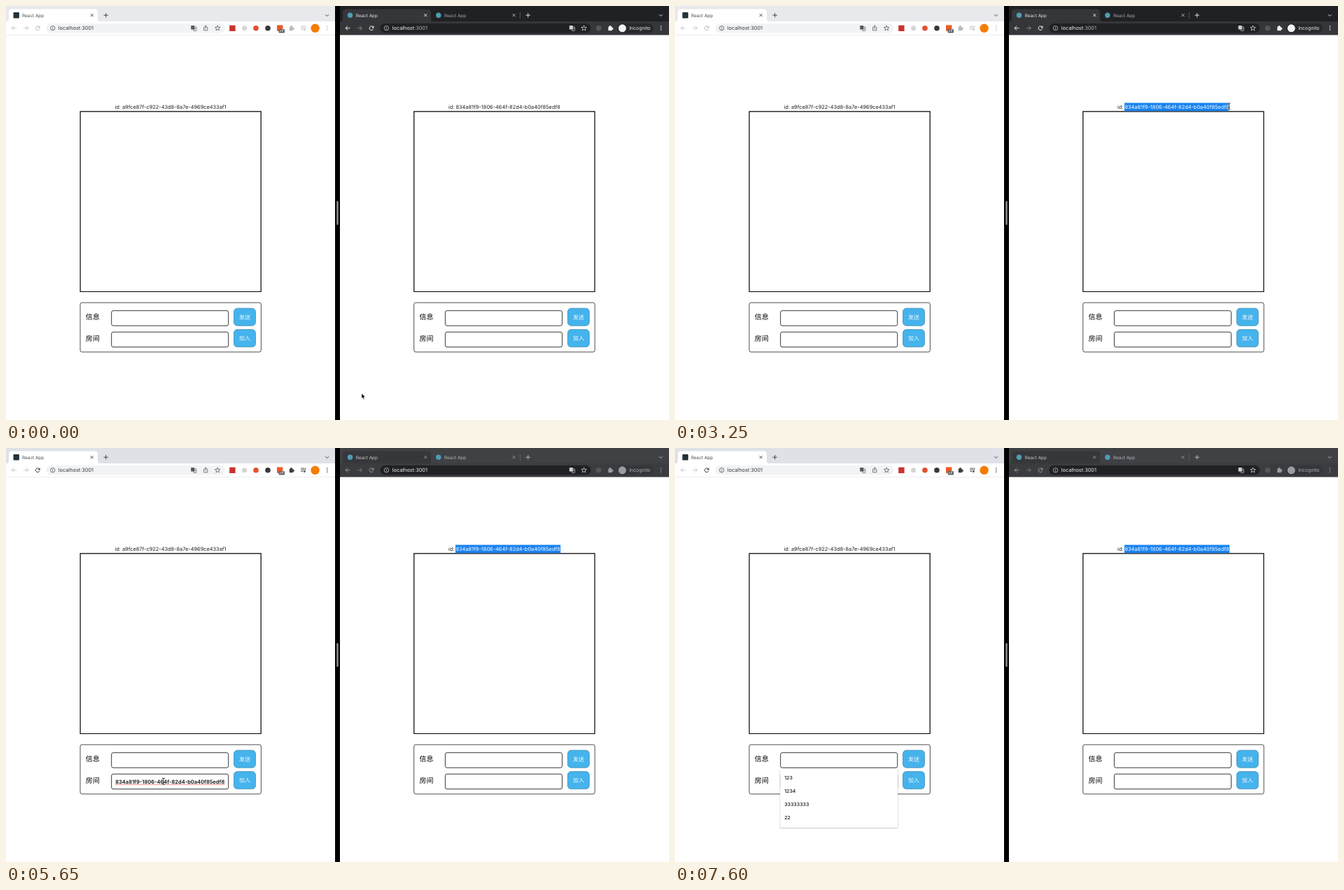
An HTML page with a canvas that plays this animation: 947 by 592 pixels, repeating every 8000 ms.

```html
<!DOCTYPE html>
<html lang="zh">
<head>
<meta charset="utf-8">
<style>
html, body { margin: 0; width: 100%; height: 100%; overflow: hidden; background: #fff; }
canvas { display: block; width: 947px; height: 592px; }
</style>
</head>
<body>
<canvas id="stage"></canvas>
<script>
const W = 947, H = 592, LOOP = 8000, STEP = 50;
const canvas = document.getElementById('stage');
const dpr = window.devicePixelRatio || 1;
canvas.width = W * dpr;
canvas.height = H * dpr;
const ctx = canvas.getContext('2d');
ctx.scale(dpr, dpr);
ctx.textRendering = 'geometricPrecision';

const SANS = 'Inter, sans-serif', CJK = '"Noto Sans CJK SC", "Noto Sans CJK", sans-serif';
const LEFT_ID = 'a9fce87f-c922-43d8-8a7e-4969ce433af1';
const RIGHT_ID = '834a81f9-1806-464f-82d4-b0a40f85edf8';
const ROOMS = ['123', '1234', '22'], MESSAGES = ['123', '1234', '33333333', '22'];
const PAGE_SHIFT = 476.7, SEL_LEFT = 642, SEL_RIGHT = 792;
const BLUE = '#45b3ec', BLUE_HOVER = '#147fb6', BLUE_CLICKED = '#2a97cf';

// Pointer stops: time, x, y
const PATH = [
  [0, 508, 554], [200, 545, 500], [400, 628, 335], [600, 687, 205], [700, 683, 170],
  [850, 642.5, 148.5], [900, 642, 148], [950, 641.5, 145], [1200, 641.5, 145],
  [1250, 642, 145], [1600, 642, 145], [1900, 642.8, 145.5], [2000, 642.8, 145.5],
  [2200, 675, 145], [2450, 760, 146], [2700, 797, 148], [2900, 797, 148],
  [3000, 796, 148.5], [3200, 796, 148.5], [3250, 791.3, 143.5], [3650, 791.3, 143.5],
  [3750, 690, 180], [3850, 430, 290], [3950, 257, 361], [4050, 257, 361],
  [4250, 236, 430], [4450, 222, 480], [4800, 222, 480], [4850, 220, 479],
  [5000, 213.3, 477], [5600, 213.3, 477], [5800, 260, 476], [6000, 322, 479],
  [6200, 341, 480], [6550, 341, 480], [6600, 340.5, 480], [6800, 340.5, 480],
  [7000, 310, 472], [7200, 258, 454], [7400, 243, 448], [8000, 243, 448]
];

function pointer(t) {
  const i = Math.max(1, PATH.findIndex(p => p[0] >= t));
  const [t0, x0, y0] = PATH[i - 1], [t1, x1, y1] = PATH[i];
  const k = (t - t0) / (t1 - t0);
  return { x: x0 + (x1 - x0) * k, y: y0 + (y1 - y0) * k };
}

function rect(x, y, w, h, fill) {
  ctx.fillStyle = fill;
  ctx.fillRect(x, y, w, h);
}
function round(x, y, w, h, r, fill, stroke, lw = 1) {
  ctx.beginPath();
  ctx.roundRect(x, y, w, h, r);
  paint(fill, stroke, lw);
}
function disc(x, y, r, fill, stroke, lw = 1) {
  ctx.beginPath();
  ctx.arc(x, y, r, 0, 7);
  paint(fill, stroke, lw);
}
function paint(fill, stroke, lw) {
  if (fill) { ctx.fillStyle = fill; ctx.fill(); }
  if (stroke) { ctx.strokeStyle = stroke; ctx.lineWidth = lw; ctx.stroke(); }
}
function line(color, lw, ...pts) {
  ctx.beginPath();
  for (let i = 0; i < pts.length; i += 2) ctx.lineTo(pts[i], pts[i + 1]);
  paint(null, color, lw);
}
function text(s, x, mid, size, color, { weight = 400, align = 'left', font = SANS } = {}) {
  ctx.font = `${weight} ${size}px ${font}`;
  ctx.textAlign = align;
  ctx.fillStyle = color;
  ctx.fillText(s, x, mid + size * 0.365);
}

// Browser chrome icons
function cross(x, y, c) {
  line(c, 0.9, x - 2, y - 2, x + 2, y + 2);
  line(c, 0.9, x + 2, y - 2, x - 2, y + 2);
}
function plus(x, y, c) {
  line(c, 1, x - 3.2, y, x + 3.2, y);
  line(c, 1, x, y - 3.2, x, y + 3.2);
}
function chevron(x, y, c) { line(c, 1, x - 2.3, y - 1.1, x, y + 1.2, x + 2.3, y - 1.1); }
function arrow(x, y, dir, c) {
  line(c, 0.95, x - 3.3, y, x + 3.3, y);
  line(c, 0.95, x, y - 3.2, x + 3.2 * dir, y, x, y + 3.2);
}
function reload(x, y, c) {
  ctx.beginPath();
  ctx.arc(x, y, 2.9, 0.4, 5.4);
  paint(null, c, 1);
  ctx.beginPath();
  ctx.moveTo(x + 3.4, y - 3.6);
  ctx.lineTo(x + 3.4, y - 0.3);
  ctx.lineTo(x + 0.3, y - 0.3);
  paint(c);
}
function info(x, y, c) {
  disc(x, y, 3.2, null, c, 0.8);
  rect(x - 0.4, y - 0.4, 0.8, 2.2, c);
  rect(x - 0.4, y - 1.8, 0.8, 0.8, c);
}
function dots(x, y, c) { for (const d of [-2.6, 0, 2.6]) disc(x, y + d, 0.8, c); }
function star(x, y, c) {
  ctx.beginPath();
  for (let i = 0; i < 10; i++) {
    const r = i % 2 ? 1.7 : 3.9, a = i * Math.PI / 5 - Math.PI / 2;
    ctx.lineTo(x + r * Math.cos(a), y + 0.3 + r * Math.sin(a));
  }
  ctx.closePath();
  paint(null, c, 0.8);
}
function translate(x, y, c) {
  round(x - 3.8, y - 3.8, 5, 5.6, 0.6, c);
  round(x - 0.3, y - 1.8, 4.2, 5.6, 0.6, null, c, 0.7);
  line(c, 0.6, x + 0.7, y + 0.2, x + 3, y + 0.2);
  line(c, 0.6, x + 1, y + 2.4, x + 2.8, y + 0.2);
}
function share(x, y, c) {
  line(c, 0.8, x - 1.3, y - 1, x - 2.6, y - 1, x - 2.6, y + 3.4, x + 2.6, y + 3.4, x + 2.6, y - 1, x + 1.3, y - 1);
  line(c, 0.8, x, y + 1.2, x, y - 3.4);
  line(c, 0.8, x - 1.6, y - 2, x, y - 3.6, x + 1.6, y - 2);
}
function puzzle(x, y, c) {
  rect(x - 3.2, y - 2, 5.4, 5.6, c);
  disc(x - 0.5, y - 2.4, 1.3, c);
  disc(x + 2.6, y + 0.8, 1.3, c);
}
function playlist(x, y, c) {
  for (const d of [-2.6, -0.5]) line(c, 0.9, x - 3.6, y + d, x + 1.4, y + d);
  line(c, 0.9, x - 3.6, y + 1.7, x - 0.4, y + 1.7);
  line(c, 0.8, x + 4, y - 2.7, x + 2.4, y - 2.7, x + 2.4, y + 2);
  disc(x + 1.4, y + 2, 1.2, c);
}
function tabShape(x, w, fill) {
  ctx.beginPath();
  ctx.moveTo(x - 4, 22.5);
  ctx.quadraticCurveTo(x, 22.5, x, 18);
  ctx.lineTo(x, 9);
  ctx.quadraticCurveTo(x, 4.5, x + 4.5, 4.5);
  ctx.lineTo(x + w - 4.5, 4.5);
  ctx.quadraticCurveTo(x + w, 4.5, x + w, 9);
  ctx.lineTo(x + w, 18);
  ctx.quadraticCurveTo(x + w, 22.5, x + w + 4, 22.5);
  paint(fill);
}

function leftChrome(active) {
  const ink = active ? '#3c4043' : '#b9bbbe', pale = '#c3c5c8', dark = '#55585c';
  rect(0, 0, 470, 23, active ? '#dee1e6' : '#e7e9ec');
  tabShape(4, 127, '#fff');
  rect(0, 22, 470, 19, '#fff');
  rect(0, 41, 470, 0.6, '#dfe1e4');
  round(10.5, 9, 8.4, 8.4, 1, '#24323b');
  text('React App', 23, 13.3, 6.4, '#45484c');
  cross(122.7, 13.2, '#3c4043');
  plus(142.7, 13.2, '#45484c');
  chevron(458.7, 13.3, '#45484c');

  arrow(11.5, 31.7, -1, pale);
  arrow(28.5, 31.7, 1, pale);
  reload(45.2, 31.7, ink);
  round(57.5, 25, 255, 13.4, 6.7, '#f1f3f4');
  info(66.7, 31.7, '#4c5054');
  text('localhost:3001', 74.8, 31.8, 7.35, '#3a3c40');
  translate(268, 31.7, dark);
  share(285.2, 31.4, dark);
  star(302.2, 31.5, dark);
  rect(319.2, 27.6, 8.4, 8.4, '#c9332e');
  disc(340.6, 31.7, 3.5, '#d5d5d5');
  disc(357, 31.7, 3.8, '#e2502f');
  disc(374, 31.7, 3.8, '#36383b');
  rect(387, 27.4, 8.4, 8.4, '#ee5a24');
  round(389.6, 33, 8.4, 5.6, 1, '#5f6368');
  text('off', 393.8, 35.7, 4.5, '#fff', { align: 'center' });
  puzzle(408, 31.6, ink);
  playlist(424.8, 31.7, ink);
  disc(441.6, 31.8, 6.2, '#f57c00');
  dots(458.8, 31.7, ink);
}

function rightChrome(active) {
  const ink = active ? '#f1f3f4' : '#9a9ca0', dim = active ? '#85878b' : '#77797d';
  const bar = active ? '#35363a' : '#3b3c40', label = active ? '#e4e6e9' : '#c7c9cc';
  rect(477, 0, 470, 23, active ? '#202124' : '#3f4145');
  tabShape(481, 126, active ? '#35363a' : '#36373b');
  rect(477, 22, 470, 19, bar);
  rect(477, 41, 470, 0.6, '#4b4d51');
  disc(491.5, 13.2, 3.7, '#4f9db3');
  text('React App', 499.7, 13.3, 6.4, label);
  cross(599.3, 13.2, ink);
  disc(617.8, 13.2, 3.7, '#4f9db3');
  text('React App', 626, 13.3, 6.4, active ? '#a7aaae' : '#b5b7ba');
  cross(725.5, 13.2, active ? '#c0c2c5' : ink);
  rect(733.8, 8.5, 0.7, 9.5, '#6a6c70');
  plus(745.7, 13.2, active ? '#d8dadd' : '#b5b7ba');
  chevron(935.3, 13.3, active ? '#d8dadd' : '#b5b7ba');

  arrow(488.2, 31.7, -1, ink);
  arrow(505.2, 31.7, 1, dim);
  reload(522, 31.7, ink);
  round(534.3, 25, 301, 13.4, 6.7, '#202124');
  info(543.4, 31.7, '#c6c8cb');
  text('localhost:', 551.7, 31.8, 7.35, '#eceef0');
  const hostWidth = ctx.measureText('localhost:').width;
  text('3001', 551.7 + hostWidth, 31.8, 7.35, active ? '#b0b3b7' : '#eceef0');
  translate(808.5, 31.7, '#cfd1d4');
  star(825.5, 31.5, '#d8dadd');
  disc(846.5, 31.7, 3.8, '#55575b');
  puzzle(863.5, 31.6, ink);
  round(873, 25, 52, 13.4, 6.7, active ? '#28292c' : '#35363a');
  disc(880.3, 31.8, 5.5, active ? '#f1f3f4' : '#9a9ca0');
  text('Incognito', 890.2, 31.8, 6.9, active ? '#eceef0' : '#aeb0b4');
  dots(935.5, 31.7, ink);
}

function button(label, y, fill) {
  round(325.5, y, 31, 25, 5, fill, '#3a86ac', 0.7);
  text(label, 341, y + 12.4, 8, '#f4fbff', { align: 'center', font: CJK });
}

function page(shift, id, joinFill) {
  ctx.save();
  ctx.translate(shift, 0);
  text('id: ' + id, 235, 144.4, 7.4, '#222', { align: 'center' });
  ctx.beginPath();
  ctx.rect(106.1, 150.9, 258.1, 257.6);
  paint('#fff', '#000', 1.2);
  round(106, 424.2, 258.4, 70.6, 2.6, null, '#222', 0.8);
  ['信息', '房间'].forEach((label, i) =>
    text(label, 113.8, 444.7 + i * 30.4, 10, '#000', { weight: 500, font: CJK }));
  for (const y of [435.7, 466.2]) round(150.7, y, 167, 21.5, 2.5, '#fff', '#222', 0.9);
  button('发送', 432.2, BLUE);
  button('加入', 462.6, joinFill);
  ctx.restore();
}

function selectionEnd(t, x) {
  if (t >= 3700) return SEL_RIGHT;
  ctx.font = `400 7.4px ${SANS}`;
  let end = SEL_LEFT;
  for (let i = 1; i <= RIGHT_ID.length; i++) {
    const next = SEL_LEFT + ctx.measureText(RIGHT_ID.slice(0, i)).width;
    if ((end + next) / 2 > x - 2) break;
    end = next;
  }
  return Math.min(end, SEL_RIGHT);
}

function selection(t, x) {
  const width = selectionEnd(t, x) - SEL_LEFT;
  if (width <= 0) return;
  ctx.save();
  ctx.beginPath();
  ctx.rect(SEL_LEFT, 138.6, width, 11.6);
  ctx.clip();
  rect(SEL_LEFT, 138, width, 13, '#1a83ee');
  text('id: ' + RIGHT_ID, 235 + PAGE_SHIFT, 144.4, 7.4, '#fff', { align: 'center' });
  ctx.restore();
}

function pastedRoom() {
  ctx.save();
  ctx.beginPath();
  ctx.rect(155.8, 467, 156.8, 20);
  ctx.clip();
  text(RIGHT_ID, 312.2, 477, 7.5, '#111', { weight: 600, align: 'right' });
  ctx.setLineDash([1.3, 0.5]);
  line('#f0463c', 0.9, 156, 481.2, 312.2, 481.2);
  ctx.restore();
}

function suggestions(top, items, alpha) {
  const height = items.length * 19 + 9;
  ctx.save();
  ctx.globalAlpha = alpha;
  ctx.shadowColor = 'rgba(0,0,0,.35)';
  ctx.shadowBlur = 2 * dpr;
  ctx.shadowOffsetY = 0.5 * dpr;
  round(150.2, top, 168, height, 1.5, '#fff');
  ctx.shadowColor = 'transparent';
  items.forEach((s, i) => text(s, 156.2, top + 13.7 + i * 19, 7, '#111', { weight: 500 }));
  ctx.restore();
}

function arrowPointer(x, y) {
  ctx.beginPath();
  for (const [dx, dy] of [[0, 0], [0, 7.2], [1.6, 5.8], [2.8, 8.5], [4, 8], [2.9, 5.4], [5, 5.2]])
    ctx.lineTo(x + dx, y + dy);
  ctx.closePath();
  paint('#000', '#fff', 0.5);
}
function beamPointer(x, y) {
  for (const [color, lw] of [['#fff', 1.8], ['#111', 0.9]]) {
    line(color, lw, x, y - 4, x, y + 4);
    for (const s of [-1, 1]) line(color, lw, x - 2, y + 4.7 * s, x, y + 4 * s, x + 2, y + 4.7 * s);
  }
  line('#111', 0.8, x - 1.2, y + 1.5, x + 1.2, y + 1.5);
}
function handPointer(x, y) {
  ctx.beginPath();
  for (const [dx, dy] of [[-1.3, -0.6], [-0.2, -0.6], [0.1, 2.3], [3.6, 3.2], [3.8, 5], [2.9, 7.8],
    [-1.3, 7.8], [-3.8, 4.4], [-3, 3.6], [-1.4, 4.8]]) ctx.lineTo(x + dx, y + dy);
  ctx.closePath();
  ctx.lineJoin = 'round';
  paint('#fff', '#111', 0.9);
  ctx.lineJoin = 'miter';
}

function drawPointer(t, { x, y }, overJoin) {
  if ((t >= 5150 && t < 5650) || t >= 7450) return;
  const overText = t >= 950 && t < 3750;
  const overInput = x > 150 && x < 318 && ((y > 436 && y < 457) || (y > 466 && y < 487));
  if (overJoin) handPointer(x, y);
  else if (overText || (t >= 4900 && overInput)) beamPointer(x, y);
  else arrowPointer(x, y);
}

function draw(t) {
  const p = pointer(t);
  const leftActive = t >= 4500;
  const overJoin = t > 5600 && p.x > 325.5 && p.y > 462.5;
  const joinFill = !overJoin ? BLUE : t < 6400 ? BLUE_HOVER : BLUE_CLICKED;

  rect(0, 0, W, H, '#fff');
  leftChrome(leftActive);
  rightChrome(!leftActive);
  rect(470, 0, 7, H, '#000');
  round(472.2, 279, 2.6, 34, 1.3, '#8d8d8d');
  page(0, LEFT_ID, joinFill);
  page(PAGE_SHIFT, RIGHT_ID, BLUE);
  if (t >= 2050) selection(t, p.x);
  if (t >= 5500 && t < 6400) pastedRoom();
  if (t >= 5150 && t < 5500) suggestions(488.5, ROOMS, t < 5250 ? 0.5 : 1);
  if (t >= 7450) suggestions(458, MESSAGES, Math.min(1, (t - 7400) / 200));
  drawPointer(t, p, overJoin);
}

const start = performance.now();
function tick() {
  const t = (performance.now() - start) % LOOP;
  draw(Math.floor(t / STEP) * STEP);
  requestAnimationFrame(tick);
}
tick();
</script>
</body>
</html>
```
